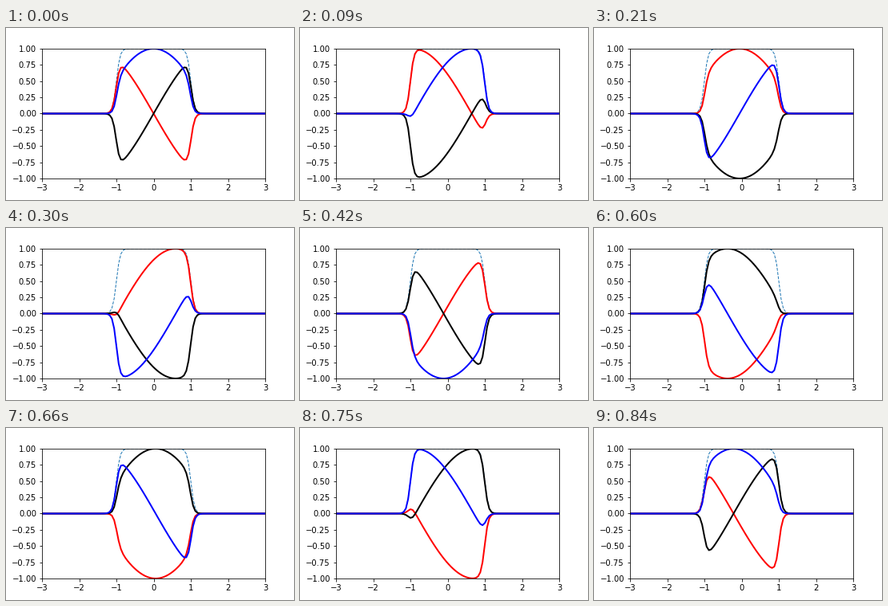
These frames come from a looping animation (360 by 216 pixels, 870 ms). A matplotlib script:

```python
import numpy as np
import matplotlib.pyplot as plt
from matplotlib.animation import FuncAnimation

FRAMES = 29
INTERVAL = 30  # ms

x = np.linspace(-3, 3, 100)
window = 0.5 * (np.tanh(10 * (x + 1)) - np.tanh(10 * (x - 1)))

plt.rcParams["font.family"] = "DejaVu Sans"
plt.rcParams["font.size"] = 10

fig = plt.figure(figsize=(5, 3), dpi=72, facecolor="white")
fig.subplots_adjust(left=0.125, right=0.9, bottom=0.125, top=0.88)
ax = fig.add_subplot()
ax.set_xlim(-3, 3)
ax.set_ylim(-1, 1)
ax.set_xticks(np.arange(-3, 4))
ax.set_yticks(np.linspace(-1, 1, 9))

ax.plot(x, window, "--", lw=1, color="C0")
red, = ax.plot([], [], "r", lw=2)
black, = ax.plot([], [], "k", lw=2)
blue, = ax.plot([], [], "b", lw=2)


def update(frame):
    phase = x - 2 * np.pi * frame / FRAMES
    sine = window * np.sin(phase)
    red.set_data(x, -sine)
    black.set_data(x, sine)
    blue.set_data(x, window * np.cos(phase))
    return red, black, blue


anim = FuncAnimation(fig, update, frames=FRAMES, interval=INTERVAL,
                     repeat=True, repeat_delay=0)
plt.show()
```
